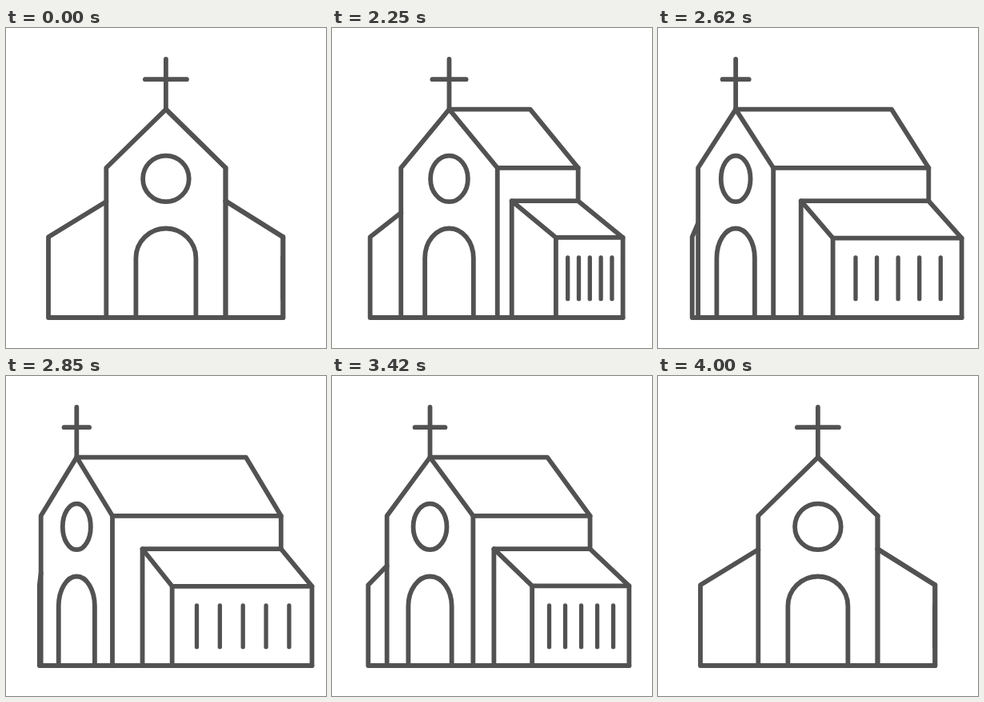
Recreate the animation shown at these times as an HTML page with a canvas. Size 400 px wide and 400 px high, loop 4.02 s.

```html
<!DOCTYPE html>
<html lang="en">
<head>
<meta charset="utf-8">
<title>Turning church</title>
<style>
html, body { margin: 0; width: 100%; height: 100%; overflow: hidden; background: #fff; }
canvas { display: block; width: 100vmin; height: 100vmin; }
</style>
</head>
<body>
<canvas id="stage" width="400" height="400"></canvas>
<script>
const ctx = document.getElementById("stage").getContext("2d");
const LOOP = 4020, START = 2000, HALF = 1000;
const BASE = 362, ROOF = 101.6, EAVE = 174.8, WING = 216.2;

// Cubic bezier easing with control points (x1, 0) and (x2, 1)
function ease(x1, x2, t) {
  let lo = 0, hi = 1;
  for (let i = 0; i < 24; i++) {
    const u = (lo + hi) / 2, v = 1 - u;
    const x = 3 * u * v * v * x1 + 3 * u * u * v * x2 + u * u * u;
    if (x < t) lo = u; else hi = u;
  }
  return lo * lo * (3 - 2 * lo);
}

// 0 = seen from the front, 1 = turned to the side
function turnAt(ms) {
  if (ms < START + 20 || ms >= START + 2 * HALF) return 0;
  const t = (ms - START) / HALF;
  return t < 1 ? ease(0.2, 0.17, t) : 1 - ease(0.6, 0.4, t - 1);
}

function line(...pts) {
  ctx.beginPath();
  for (let i = 0; i < pts.length; i += 2) ctx.lineTo(pts[i], pts[i + 1]);
  ctx.stroke();
}

function draw(p) {
  const mix = (a, b) => a + (b - a) * p;

  ctx.fillStyle = "#fff";
  ctx.fillRect(0, 0, 400, 400);
  ctx.strokeStyle = "#525252";
  ctx.lineCap = ctx.lineJoin = "round";
  ctx.lineWidth = 5.8;

  const cx = mix(199.9, 87);
  const half = mix(74.6, 44.3);
  const left = cx - half, right = cx + half;
  const ridge = mix(199.9, 301), back = mix(274.5, 344.6);
  const inner = mix(274.5, 169.3), outer = mix(346.3, 206);
  const far = mix(346.3, 382.9), near = mix(53, 41.7);
  const eave = mix(261.2, 262.8);

  // cross
  const arm = mix(26, 15.6);
  line(cx, 39, cx, ROOF);
  line(cx - arm, 64.2, cx + arm, 64.2);

  // front wall
  line(left, BASE, left, EAVE, cx, ROOF, right, EAVE, right, BASE);
  ctx.beginPath();
  ctx.ellipse(cx, 188.4, mix(28.8, 17.4), 28.8, 0, 0, 2 * Math.PI);
  ctx.stroke();
  const door = mix(37.5, 22.4);
  ctx.beginPath();
  ctx.moveTo(cx - door, BASE);
  ctx.ellipse(cx, 287.8, door, 37.3, 0, Math.PI, 2 * Math.PI);
  ctx.lineTo(cx + door, BASE);
  ctx.stroke();

  // roof and side wall
  line(cx, ROOF, ridge, ROOF, back, EAVE, right, EAVE);
  line(back, EAVE, back, WING);

  // wings and ground
  line(left, mix(217, 246.5), near, 261.2, near, BASE, far, BASE);
  line(inner, BASE, inner, WING, back, WING, far, eave, far, BASE);
  line(inner, WING, outer, eave, outer, BASE);
  line(outer, eave, far, eave);

  // windows
  ctx.lineWidth = 5.3;
  for (let i = 0; i < 5; i++) {
    const x = mix(346.3, 237.2 + 29.2 * i);
    line(x, 287, x, 338.7);
  }
}

function frame() {
  draw(turnAt(performance.now() % LOOP));
  requestAnimationFrame(frame);
}
frame();
</script>
</body>
</html>
```
